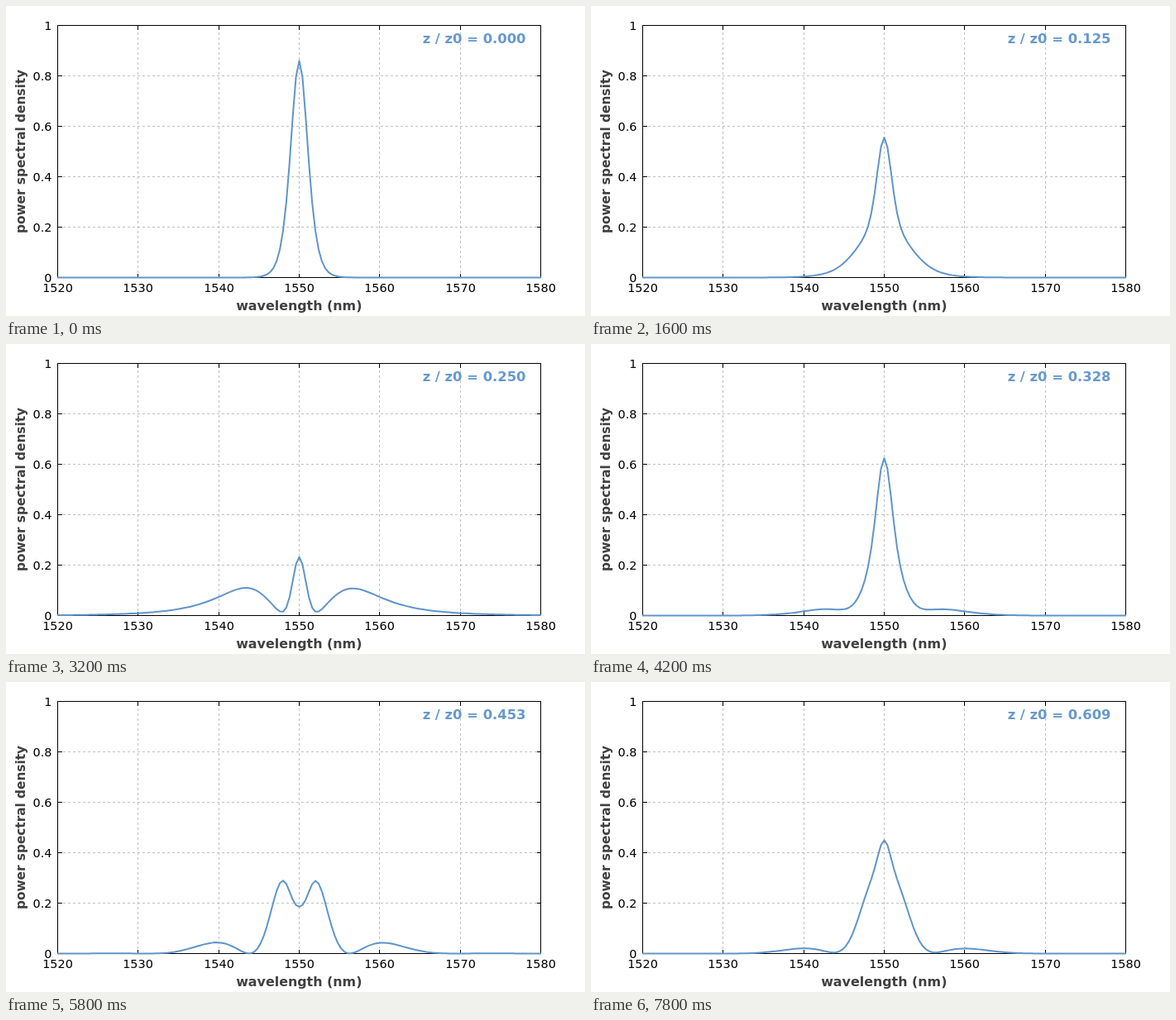
Animation of 700x375 px, one loop 8 s. Source, as an HTML page:

```html
<!DOCTYPE html>
<html lang="en">
<head>
<meta charset="utf-8">
<title>Spectrum of a third-order soliton</title>
<style>
  html, body { margin: 0; width: 100%; height: 100%; overflow: hidden; background: #fff; }
  svg { display: block; width: 700px; height: 375px; font-family: "DejaVu Sans", Verdana, sans-serif; }
  .grid { stroke: #c0c0c0; stroke-dasharray: 3 3; shape-rendering: crispEdges; }
  .axis { stroke: #000; fill: none; shape-rendering: crispEdges; }
  .num { font-size: 14.4px; }
  .label { font-weight: bold; fill: #404040; text-anchor: middle; }
  #readout { font-size: 16.4px; font-weight: bold; fill: #6699cc; text-anchor: end; }
  #curve { fill: none; stroke: #6095c9; stroke-width: 2; stroke-linejoin: round; }
</style>
</head>
<body>
<svg viewBox="0 0 700 375">
  <clipPath id="plot"><rect x="62" y="23" width="585" height="307"/></clipPath>
  <g id="frame"></g>
  <text class="label" x="354.3" y="368" font-size="15.9">wavelength (nm)</text>
  <text class="label" transform="translate(23 176) rotate(-90)" font-size="15.3">power spectral density</text>
  <text id="readout" x="628.5" y="45">z / z0 = 0.000</text>
  <polyline id="curve" clip-path="url(#plot)"/>
</svg>
<script>
const LEFT = 62.5, RIGHT = 646.5, TOP = 23.5, BOTTOM = 328.5;
const xOf = nm => LEFT + (nm - 1520) / 60 * (RIGHT - LEFT);
const yOf = v => BOTTOM - v * (BOTTOM - TOP);
const snap = v => Math.floor(v) + 0.5;

function drawAxes() {
  const grid = [], axis = [], nums = [];
  const line = (cls, x1, y1, x2, y2) =>
    `<line class="${cls}" x1="${x1}" y1="${y1}" x2="${x2}" y2="${y2}"/>`;
  const num = (x, y, anchor, text) =>
    `<text class="num" x="${x}" y="${y}" text-anchor="${anchor}">${text}</text>`;
  for (let nm = 1520; nm <= 1580; nm += 10) {
    const x = snap(xOf(nm));
    if (nm > 1520 && nm < 1580) grid.push(line("grid", x, BOTTOM, x, TOP));
    axis.push(line("axis", x, BOTTOM, x, BOTTOM - 5), line("axis", x, TOP, x, TOP + 5));
    nums.push(num(x, 346, "middle", nm));
  }
  for (let i = 0; i <= 5; i++) {
    const y = snap(yOf(i / 5));
    if (i > 0 && i < 5) grid.push(line("grid", LEFT, y, RIGHT, y));
    axis.push(line("axis", LEFT, y, LEFT + 5, y), line("axis", RIGHT, y, RIGHT - 5, y));
    nums.push(num(55.5, y + 5.5, "end", i / 5));
  }
  axis.push(`<rect class="axis" x="${LEFT}" y="${TOP}" width="${RIGHT - LEFT}" height="${BOTTOM - TOP}"/>`);
  document.getElementById("frame").innerHTML = [...grid, ...axis, ...nums].join("");
}

// In-place radix-2 FFT; sign +1 or -1, unscaled.
function fft(re, im, sign) {
  const n = re.length;
  for (let i = 1, j = 0; i < n; i++) {
    let bit = n >> 1;
    for (; j & bit; bit >>= 1) j ^= bit;
    j ^= bit;
    if (i < j) {
      [re[i], re[j]] = [re[j], re[i]];
      [im[i], im[j]] = [im[j], im[i]];
    }
  }
  for (let half = 1; half < n; half *= 2) {
    for (let k = 0; k < half; k++) {
      const c = Math.cos(Math.PI * k / half), s = sign * Math.sin(Math.PI * k / half);
      for (let a = k; a < n; a += 2 * half) {
        const b = a + half;
        const tr = re[b] * c - im[b] * s, ti = re[b] * s + im[b] * c;
        re[b] = re[a] - tr; im[b] = im[a] - ti;
        re[a] += tr; im[a] += ti;
      }
    }
  }
}

const STEPS = 40, STEP_MS = 200, PER_PERIOD = 64;
const SAMPLES = 512, WINDOW_PS = 20, T0_PS = 1 / 1.7627, ORDER = 3, PEAK = 0.86;
const LAMBDA0 = 1550, C_NM_PER_PS = 299792.458;

// Split-step solution of the nonlinear Schroedinger equation, one spectrum per step.
function propagate() {
  const SUB = 60, dz = Math.PI / 2 / PER_PERIOD / SUB;
  const span = WINDOW_PS / T0_PS;
  const re = new Float64Array(SAMPLES), im = new Float64Array(SAMPLES);
  const cosD = new Float64Array(SAMPLES), sinD = new Float64Array(SAMPLES);
  for (let i = 0; i < SAMPLES; i++) {
    re[i] = ORDER / Math.cosh((i / SAMPLES - 0.5) * span);
    const w = 2 * Math.PI * (i < SAMPLES / 2 ? i : i - SAMPLES) / span;
    cosD[i] = Math.cos(w * w * dz / 2) / SAMPLES;
    sinD[i] = -Math.sin(w * w * dz / 2) / SAMPLES;
  }
  const rotate = (i, c, s) => {
    const r = re[i];
    re[i] = r * c - im[i] * s;
    im[i] = r * s + im[i] * c;
  };
  const kerr = h => {
    for (let i = 0; i < SAMPLES; i++) {
      const phase = (re[i] * re[i] + im[i] * im[i]) * h;
      rotate(i, Math.cos(phase), Math.sin(phase));
    }
  };
  const spectrum = () => {
    const a = re.slice(), b = im.slice();
    fft(a, b, -1);
    return a.map((v, i) => v * v + b[i] * b[i]);
  };
  const spectra = [spectrum()];
  while (spectra.length < STEPS) {
    for (let s = 0; s < SUB; s++) {
      kerr(dz / 2);
      fft(re, im, -1);
      for (let i = 0; i < SAMPLES; i++) rotate(i, cosD[i], sinD[i]);
      fft(re, im, 1);
      kerr(dz / 2);
    }
    spectra.push(spectrum());
  }
  return spectra;
}

function toPoints(spectrum, scale) {
  const points = [];
  for (let k = -90; k <= 90; k++) {
    const nm = 1 / (1 / LAMBDA0 + k / WINDOW_PS / C_NM_PER_PS);
    const v = spectrum[(k + SAMPLES) % SAMPLES] * scale * (LAMBDA0 / nm) ** 2;
    points.push(xOf(nm).toFixed(2) + "," + yOf(v).toFixed(2));
  }
  return points.join(" ");
}

drawAxes();
const spectra = propagate();
const curves = spectra.map(s => toPoints(s, PEAK / spectra[0][0]));
const curve = document.getElementById("curve"), readout = document.getElementById("readout");
let shown = -1;

function tick() {
  const step = Math.floor(performance.now() / STEP_MS) % STEPS;
  if (step !== shown) {
    shown = step;
    curve.setAttribute("points", curves[step]);
    readout.textContent = "z / z0 = " + (step / PER_PERIOD).toFixed(3);
  }
  requestAnimationFrame(tick);
}
tick();
</script>
</body>
</html>
```
